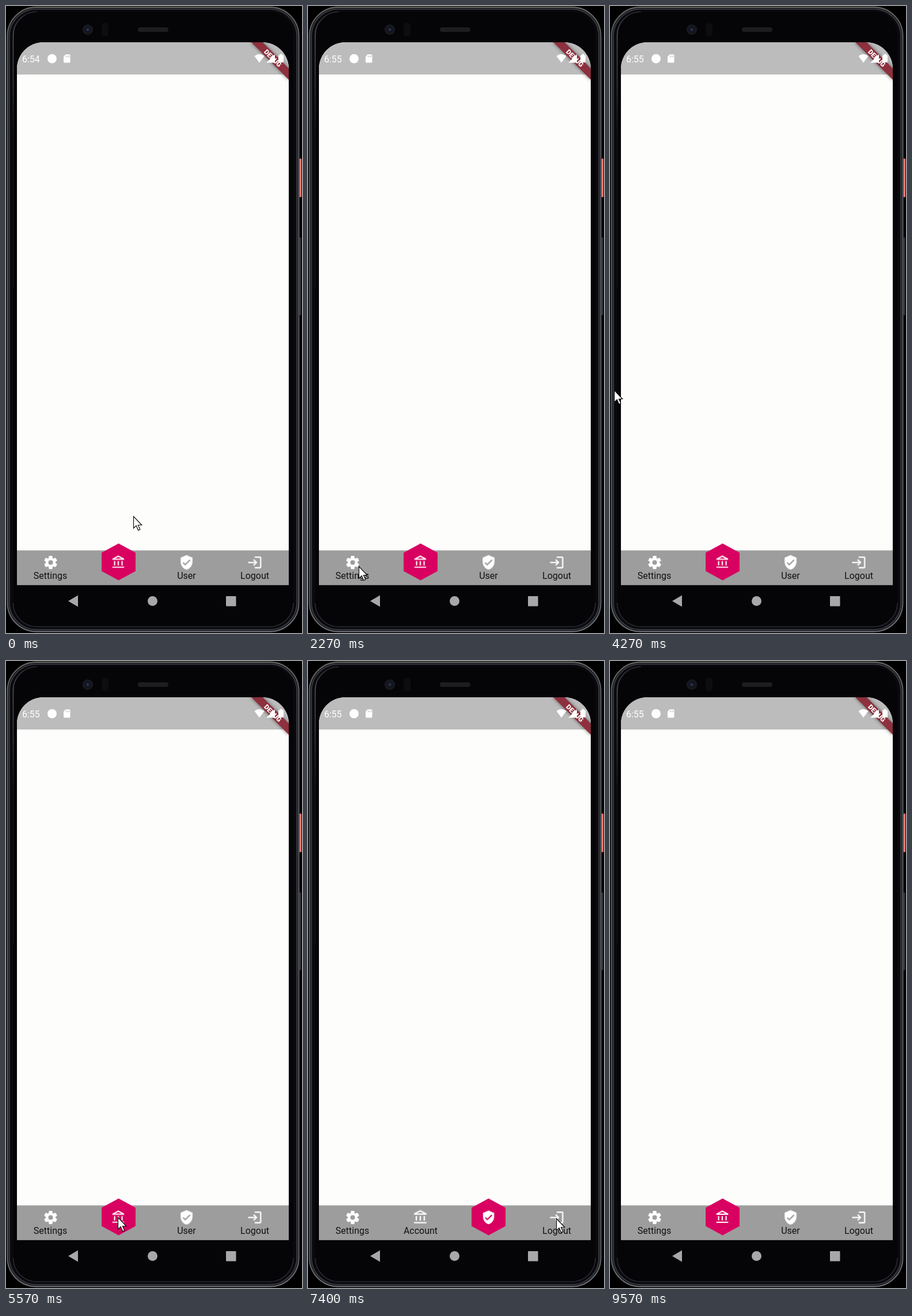
An HTML page that plays this animation: 514x1089 px, repeating every 9600 ms.

```html
<!DOCTYPE html>
<html lang="en">
<head>
<meta charset="utf-8">
<title>Hexagon navigation bar</title>
<style>
  html, body { margin: 0; width: 100%; height: 100%; overflow: hidden; background: #000; }
  svg { display: block; width: 514px; height: 1089px; }
  text { font-family: Roboto, "Open Sans", sans-serif; font-size: 16px; }
  .label { fill: #111; text-anchor: middle; }
  .debug { font-size: 11.7px; font-weight: 900; fill: #fff; text-anchor: middle; }
  .white { fill: #fff; }

  .hex, .account, .user, .before, .after, .bank, .shield { animation: 9.6s step-end infinite; }
  .hex { animation-name: select; }
  .account { animation-name: account; }
  .user { animation-name: user; }
  .before { animation-name: before; }
  .after { animation-name: after; }
  .bank { animation-name: bank; transform-origin: 195.5px 965.5px; }
  .shield { animation-name: shield; transform-origin: 313.5px 966px; }
  .cursor { animation: point 9.6s ease-in-out infinite; }

  @keyframes select {
    0%, 87.5% { transform: none; }
    63.5% { transform: translateX(118px); }
  }
  @keyframes account { 0%, 87.5% { opacity: 0; } 63.5% { opacity: 1; } }
  @keyframes user { 0%, 87.5% { opacity: 1; } 63.5% { opacity: 0; } }
  @keyframes before { 0% { opacity: 1; } 11.5% { opacity: 0; } }
  @keyframes after { 0% { opacity: 0; } 11.5% { opacity: 1; } }
  @keyframes bank { 0%, 87.5% { transform: scale(.94); } 63.5% { transform: none; } }
  @keyframes shield { 0%, 87.5% { transform: none; } 63.5% { transform: scale(.94); } }
  @keyframes point {
    0%, 6% { transform: translate(221px, 886px); }
    20%, 26% { transform: translate(88px, 973px); }
    43%, 45.5% { transform: translate(7px, 667px); }
    56.5%, 59% { transform: translate(194px, 966px); }
    62.5%, 64% { transform: translate(314px, 968px); }
    69.17%, 71% { transform: translate(384px, 969px); }
    75%, 77% { transform: translate(431px, 968px); }
    85.42%, 88.5% { transform: translate(215px, 962px); }
    97%, 100% { transform: translate(200px, 1100px); }
  }
</style>
</head>
<body>
<svg viewBox="0 0 514 1089">
  <defs>
    <linearGradient id="rim" x2="0" y2="1">
      <stop offset="0" stop-color="#6b6c66"/>
      <stop offset=".06" stop-color="#5b5c63"/>
      <stop offset=".95" stop-color="#5b5c63"/>
      <stop offset="1" stop-color="#77787f"/>
    </linearGradient>
    <linearGradient id="shine" x2="0" y2="1">
      <stop offset="0" stop-color="#2c2d32"/>
      <stop offset=".08" stop-color="#55565d"/>
      <stop offset=".25" stop-color="#3c3d43"/>
      <stop offset=".45" stop-color="#111216"/>
    </linearGradient>
    <radialGradient id="lens">
      <stop offset="0" stop-color="#34406a"/>
      <stop offset=".4" stop-color="#11131c"/>
      <stop offset="1" stop-color="#1b1c20"/>
    </radialGradient>
    <clipPath id="screen">
      <path d="M19 1005.500V109a46 46 0 0 1 46-46H445a46 46 0 0 1 46 46V1005.500z"/>
    </clipPath>
    <filter id="blur" x="-30%" y="-60%" width="160%" height="220%">
      <feGaussianBlur stdDeviation="3"/>
    </filter>
    <path id="tooth" d="M-2.4-10h4.8L3.3-6h-6.6z"/>
  </defs>

  <rect width="514" height="1089"/>

  <!-- Phone body -->
  <rect x="509.500" y="265" width="3.500" height="67" rx="1" fill="#f4786f"/>
  <rect x="509.500" y="402" width="3" height="135" rx="1" fill="#35363a"/>
  <rect x="2.500" y="2" width="506" height="1084.500" rx="50" fill="#1c1d21" stroke="url(#rim)" stroke-width="2"/>
  <rect x="6" y="5.500" width="499" height="1077.500" rx="47" fill="#0a0a0e" stroke="#3f4046" stroke-width="1.500"/>
  <rect x="12.500" y="10" width="486.500" height="1068" rx="41" fill="#050508"/>
  <path d="M12.500 490V51A41 41 0 0 1 53.500 10" fill="none" stroke="url(#shine)" stroke-width="1.500"/>
  <path d="M12.500 1037a41 41 0 0 0 41 41H458a41 41 0 0 0 41-41" fill="none" stroke="#2a2b31" stroke-width="1.500"/>
  <circle cx="142" cy="41" r="9" fill="url(#lens)"/>
  <rect x="166" y="29" width="12" height="24" rx="6" fill="#0d0d10"/>
  <rect x="229" y="37" width="53" height="8" rx="4" fill="#1d1d1e"/>

  <!-- Screen -->
  <g clip-path="url(#screen)">
    <rect x="19" y="63" width="472" height="943" fill="#fdfdfc"/>
    <rect x="19" y="63" width="472" height="56" fill="#bcbcbc"/>
    <rect x="19" y="945.500" width="472" height="60" fill="#9d9d9d"/>
    <g transform="translate(491 63) rotate(45)">
      <rect x="-46" y="32" width="92" height="14" opacity=".5" filter="url(#blur)"/>
      <rect x="-47" y="32.100" width="94" height="13.800" fill="#8e303e"/>
      <text class="debug" y="43.200">DEBUG</text>
    </g>
  </g>

  <!-- Status bar -->
  <g class="white">
    <text class="before" x="28" y="97.500">6:54</text>
    <text class="after" x="28" y="97.500">6:55</text>
    <circle cx="80" cy="91.500" r="8"/>
    <path d="M103.500 84H110a1.500 1.500 0 0 1 1.500 1.500V97a1.500 1.500 0 0 1-1.500 1.500h-8.500a1.500 1.500 0 0 1-1.500-1.500V88z"/>
    <path d="M440 98.500L431.500 87q8.500-7 17 0z"/>
    <path d="M452 98.500L467 84v14.500z"/>
    <path d="M473 85.500h2.500v-2h4v2h2.500V98h-9z"/>
  </g>
  <path d="M104.500 86v3m2.500-3v3m2.500-3v3" stroke="#bcbcbc"/>

  <!-- Navigation bar -->
  <path class="hex" d="M195.500 933.500L225 949.500v32l-29.500 16-29.500-16v-32z" fill="#d80060"/>
  <g class="white">
    <g transform="translate(77.500 966.500) scale(1.146)">
      <circle r="5.300" fill="none" stroke="#fff" stroke-width="3.500"/>
      <use href="#tooth"/>
      <use href="#tooth" transform="rotate(60)"/>
      <use href="#tooth" transform="rotate(120)"/>
      <use href="#tooth" transform="rotate(180)"/>
      <use href="#tooth" transform="rotate(240)"/>
      <use href="#tooth" transform="rotate(300)"/>
    </g>
    <g class="bank">
      <path transform="translate(181.800 952.500) scale(1.146)" d="M4.500 10h2v7h-2zM10.500 10h2v7h-2zM16.500 10h2v7h-2zM2 19h19v2H2zM11.500 3.260L16.710 6H6.290zM11.500 1L2 6v2h19V6z" fill-rule="evenodd"/>
    </g>
    <g class="shield">
      <path transform="translate(299.800 952.500) scale(1.146)" d="M12 1L3 5v6c0 5.550 3.840 10.740 9 12 5.160-1.260 9-6.450 9-12V5zM10 17l-4-4 1.410-1.410L10 14.170l6.590-6.590L18 9z" fill-rule="evenodd"/>
    </g>
    <path transform="translate(418.200 952.700) scale(1.146)" d="M11 7L9.600 8.400l2.600 2.600H2v2h10.200l-2.600 2.600L11 17l5-5zM20 19h-8v2h8a2 2 0 0 0 2-2V5a2 2 0 0 0-2-2h-8v2h8z"/>
  </g>
  <g class="label">
    <text x="77" y="995">Settings</text>
    <text class="account" x="195.500" y="995">Account</text>
    <text class="user" x="313.500" y="995">User</text>
    <text x="432" y="995">Logout</text>
  </g>

  <!-- System buttons -->
  <g fill="#a8a8a8">
    <path d="M108 1033.500l17-10v20z"/>
    <circle cx="254.500" cy="1033.500" r="8.500"/>
    <rect x="382" y="1025" width="17.500" height="17.500" rx="1"/>
  </g>

  <path class="cursor" d="M.5.5V21l4.700-4.400 3.400 8 3.200-1.400-3.400-7.700H14.700z" fill="#fff" stroke="#111" stroke-width="1.200"/>
</svg>
</body>
</html>
```
